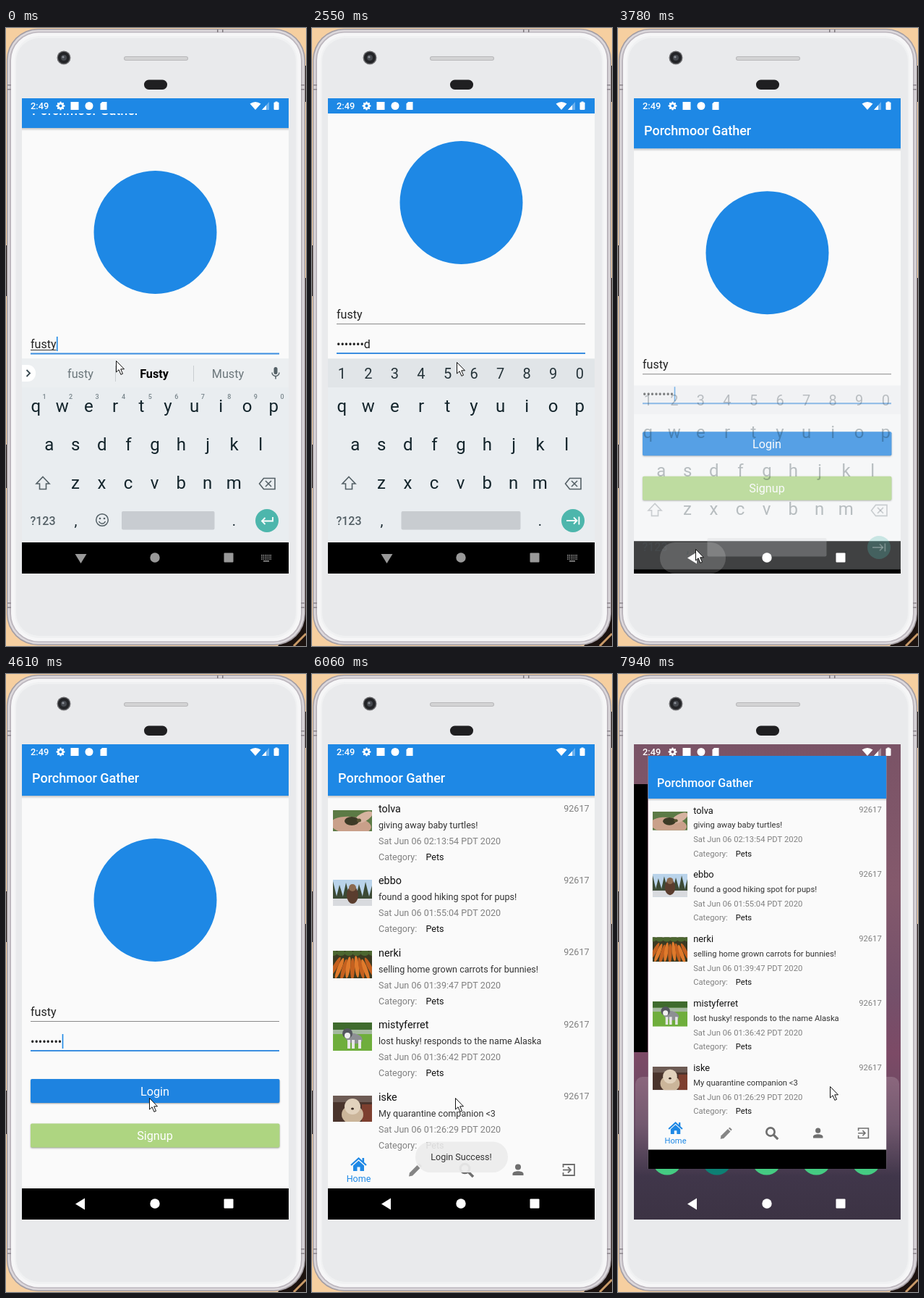
Write an HTML page with a canvas that moves like this. It is 415 by 853 pixels and loops after 8 s.

```html
<!DOCTYPE html>
<html lang="en">
<head>
<meta charset="utf-8">
<title>Phone login</title>
<style>
html, body { margin: 0; width: 100%; height: 100%; overflow: hidden; background: #f6cfa0; }
canvas { display: block; }
</style>
</head>
<body>
<canvas id="stage" width="415" height="853"></canvas>
<script>
const c = document.getElementById('stage').getContext('2d');
const LOOP = 8000, BLUE = '#1e88e5', PAPER = '#fafafa';
const X = 22, Y = 97, W = 369, H = 656;
const APP = 'Porchmoor Gather', USER = 'fusty', SECRET = 'password';
const keyTimes = [660, 780, 900, 1080, 1260, 1380, 1500, 1690];
const posts = [
  ['tolva', 'giving away baby turtles!', '02:13:54', 188, 29],
  ['ebbo', 'found a good hiking spot for pups!', '01:55:04', 284, 36],
  ['nerki', 'selling home grown carrots for bunnies!', '01:39:47', 382, 38],
  ['mistyferret', 'lost husky! responds to the name Alaska', '01:36:42', 481, 39],
  ['iske', 'My quarantine companion <3', '01:26:29', 582, 36]
];
// time, x, y of the pointer tip
const path = [
  [0, 152, 459], [2500, 152, 459], [2548, 200, 461], [2610, 200, 461], [2770, 334, 540],
  [2960, 300, 660], [3230, 107, 719], [3840, 107, 719], [4130, 198, 585], [6170, 198, 585],
  [6270, 300, 482], [6390, 403, 560], [6530, 250, 716], [6650, 83, 700], [6820, 240, 705],
  [7000, 307, 719], [7370, 307, 719], [7760, 293, 569], [8000, 293, 569]
];

const lerp = (a, b, p) => a + (b - a) * p;
const seg = (t, a, b) => Math.min(1, Math.max(0, (t - a) / (b - a)));
const smooth = p => p * p * (3 - 2 * p);
const out = p => 1 - (1 - p) * (1 - p);

function rect(x, y, w, h, fill) { c.fillStyle = fill; c.fillRect(x, y, w, h); }
function round(x, y, w, h, r, fill) {
  c.beginPath(); c.roundRect(x, y, w, h, r); c.fillStyle = fill; c.fill();
}
function oval(x, y, rx, ry, fill, turn = 0) {
  c.beginPath(); c.ellipse(x, y, rx, ry, turn, 0, 7); c.fillStyle = fill; c.fill();
}
function trace(pts, closed) {
  c.beginPath();
  for (let i = 0; i < pts.length; i += 2) c.lineTo(pts[i], pts[i + 1]);
  if (closed) c.closePath();
}
function poly(pts, fill) { trace(pts, true); c.fillStyle = fill; c.fill(); }
function line(pts, color, width = 1.5, closed = false) {
  trace(pts, closed); c.strokeStyle = color; c.lineWidth = width; c.stroke();
}
function ring(x, y, r, color, width) {
  c.beginPath(); c.arc(x, y, r, 0, 7); c.strokeStyle = color; c.lineWidth = width; c.stroke();
}
function text(s, x, y, size, color, align = 'left', weight = 400) {
  c.font = `${weight} ${size}px Roboto, sans-serif`;
  c.textAlign = align; c.fillStyle = color; c.fillText(s, x, y);
}
function clip(x, y, w, h) { c.beginPath(); c.rect(x, y, w, h); c.clip(); }
function group(fn) { c.save(); fn(); c.restore(); }

function phone() {
  rect(0, 0, 415, 853, '#f6cfa0');
  rect(412, 52, 3, 50, '#241a16');
  rect(412, 345, 3, 470, '#2a1e18');
  rect(0, 300, 3, 70, '#241a16');
  rect(0, 575, 3, 60, '#241a16');
  poly([376, 853, 415, 806, 415, 853], '#1c1310');
  line([398, 853, 415, 836], '#c99a68', 3);
  round(1, 1, 413, 851, 43, '#a49ea4');
  round(2.5, 2.5, 410, 848, 42, '#dcd8dc');
  round(5, 5, 405, 843, 40, '#bcb6bd');
  round(7, 6.5, 401, 840, 38, '#f6f6f7');
  round(12, 11, 391, 831, 34, '#f0f1f2');
  round(14, 14, 387, 825, 32, '#e9eaec');
  for (const x of [292, 299]) rect(x, 2, 1.5, 4, '#7d777d');
  for (const y of [78, 84, 793, 799]) {
    rect(2, y, 5, 1.5, '#8d878d'); rect(408, y, 5, 1.5, '#8d878d');
  }
  round(163, 39, 89, 6, 3, '#b9b9bb');
  round(164, 40, 87, 4, 2, '#d3d3d4');
  oval(80, 41, 9.5, 9.5, '#6b6b6e');
  oval(80, 41, 8, 8, '#232427');
  oval(80, 41, 4, 4, '#46494f');
  oval(79, 40, 1.6, 1.6, '#8c9098');
  round(191, 71.5, 32, 13.5, 6.5, '#1f1f21');
}

function statusIcons() {
  text('2:49', 34, 112, 12.8, '#fff', 'left', 500);
  ring(75.5, 107.5, 3.3, '#fff', 2.6);
  for (let i = 0; i < 8; i++) {
    const a = i * Math.PI / 4;
    oval(75.5 + 4.8 * Math.cos(a), 107.5 + 4.8 * Math.sin(a), 1.2, 1.2, '#fff');
  }
  rect(89.5, 102, 11, 11, '#fff');
  oval(115, 107.5, 5.5, 5.5, '#fff');
  poly([133, 102, 139.5, 102, 139.5, 113, 130.5, 113, 130.5, 104.5], '#fff');
  c.beginPath(); c.moveTo(345, 113); c.lineTo(337.5, 104.5);
  c.quadraticCurveTo(345, 99.5, 352.5, 104.5); c.closePath(); c.fillStyle = '#fff'; c.fill();
  poly([354, 113, 364, 102, 364, 113], 'rgba(255,255,255,.35)');
  poly([354, 113, 360, 106.4, 360, 113], '#fff');
  rect(372.5, 101.5, 3, 2, '#fff');
  round(370.5, 102.5, 7, 10.5, 1, '#fff');
}

function toolbar() {
  const g = c.createLinearGradient(0, 168, 0, 172);
  g.addColorStop(0, 'rgba(0,0,0,.22)'); g.addColorStop(1, 'rgba(0,0,0,0)');
  rect(X, 168, W, 4, g);
  rect(X, Y, W, 71, BLUE);
  text(APP, 36, 150, 18, '#fff', 'left', 500);
}

function button(label, y, fill, lift) {
  group(() => {
    c.shadowColor = 'rgba(0,0,0,.35)';
    c.shadowBlur = 2 + lift * 3; c.shadowOffsetY = 1 + lift;
    round(34, y, 344.5, 33, 2, fill);
  });
  if (lift) round(34, y, 344.5, 33, 2, `rgba(255,255,255,${.2 * lift})`);
  text(label, 206, y + 22.5, 16.2, '#fff', 'center');
}

function secretText(t) {
  const n = keyTimes.filter(k => t >= k).length;
  if (!n) return '';
  const plain = t < Math.min(keyTimes[n - 1] + 1490, 3180);
  return '•'.repeat(plain ? n - 1 : n) + (plain ? SECRET[n - 1] : '');
}

function caret(s, y) {
  c.font = '400 16px Roboto, sans-serif';
  rect(34.5 + c.measureText(s).width, y, 1.6, 20, BLUE);
}

function login(t) {
  const back = 1 - seg(t, 3520, 3830);
  const pan = t < 3520 ? lerp(30, 71, out(seg(t, 240, 365))) : 71 * back * back;
  const second = t >= 250;
  group(() => {
    c.translate(0, -pan);
    rect(X, Y, W, H + 80, PAPER);
    toolbar();
    oval(206.5, 312, 85, 85, BLUE);
    text(USER, 34, 472, 16, '#212121');
    if (!second) {
      c.font = '400 16px Roboto, sans-serif';
      rect(34, 474, c.measureText(USER).width, 1, '#333');
      caret(USER, 456);
    }
    rect(34, second ? 479 : 478.5, 344, second ? 1 : 2, second ? '#8a8a8a' : '#3b8ee0');
    const s = secretText(t);
    text(s || 'Password', 34, 513, 16, s ? '#212121' : '#9a9a9a');
    const lastKey = keyTimes.filter(k => t >= k).pop() || 250;
    if (second && Math.floor((t - lastKey) / 486) % 2 === 0) caret(s, 497);
    rect(34, second ? 519 : 520, 344, second ? 2 : 1, second ? '#3b8ee0' : '#8a8a8a');
    const lift = t < 4605 ? seg(t, 4360, 4440) : 0;
    button('Login', 559, '#1e83e0', lift);
    button('Signup', 620.5, '#aed581', 0);
    rect(X, 710, W, 140, '#000');
  });
  rect(X, Y, W, 21, BLUE);
  const hide = seg(t, 3600, 3850);
  if (hide < 1) group(() => {
    c.globalAlpha = 1 - hide;
    c.translate(0, 51 * hide);
    keyboard(t >= 300);
  });
}

function keyboard(digits) {
  const ink = '#13242b', soft = '#546066', step = 36.55;
  rect(X, 456.5, W, 254, '#e9edf0');
  rect(X, 710, W, 60, '#000');
  if (digits) {
    rect(X, 456.5, W, 39.5, '#e1e5e8');
    [...'1234567890'].forEach((k, i) => text(k, 41.3 + i * step, 484, 20, '#26343a', 'center'));
  } else {
    rect(X, 456.5, W, 39.5, '#eceff1');
    round(X, 465, 19, 23, [0, 11, 11, 0], '#fff');
    line([28.5, 472, 33, 476.5, 28.5, 481], '#37474f', 1.8);
    rect(151, 466, 1, 22, '#c9ced1');
    rect(259, 466, 1, 22, '#c9ced1');
    text('fusty', 103, 482.5, 16.2, '#6b767b', 'center');
    text('Fusty', 205, 482.5, 16.2, '#000', 'center', 700);
    text('Musty', 307, 482.5, 16.2, '#6b767b', 'center');
    round(370.5, 468, 5, 10, 2.5, soft);
    c.beginPath(); c.arc(373, 475.5, 5, 0, Math.PI);
    c.strokeStyle = soft; c.lineWidth = 1.4; c.stroke();
    rect(372.3, 480.5, 1.5, 4, soft);
  }
  [...'qwertyuiop'].forEach((k, i) => {
    text(k, 41.3 + i * step, 529.5, 24, ink, 'center');
    if (!digits) text((i + 1) % 10, 53 + i * step, 512, 9, '#78858b', 'center', 500);
  });
  [...'asdfghjkl'].forEach((k, i) => text(k, 59.7 + i * step, 582.5, 24, ink, 'center'));
  [...'zxcvbnm'].forEach((k, i) => text(k, 96 + i * step, 635.5, 24, ink, 'center'));
  line([51, 619.5, 60, 629, 55.5, 629, 55.5, 636.5, 46.5, 636.5, 46.5, 629, 42, 629], soft, 1.6, true);
  line([350.5, 629, 356.5, 621.5, 372, 621.5, 372, 636.5, 356.5, 636.5], soft, 1.6, true);
  line([359, 625, 367, 633], soft, 1.6);
  line([367, 625, 359, 633], soft, 1.6);
  text('?123', 51, 685.5, 16, soft, 'center', 500);
  text(',', 96.5, 687, 20, ink, 'center');
  text('.', 315.5, 687, 20, ink, 'center');
  if (digits) round(123.5, 667, 165, 25.5, 2, '#c8ccd0');
  else {
    round(160, 667, 128.5, 25.5, 2, '#c8ccd1');
    ring(133, 679, 8.3, soft, 1.5);
    oval(130, 677, 1.3, 1.3, soft);
    oval(136, 677, 1.3, 1.3, soft);
    c.beginPath(); c.arc(133, 679.5, 4.6, .3, Math.PI - .3); c.stroke();
  }
  oval(361, 680, 16, 16, '#4db6ac');
  if (digits) {
    line([352, 680, 366, 680], '#fff', 1.8);
    line([362, 675.5, 366.5, 680, 362, 684.5], '#fff', 1.8);
    rect(368.5, 674.5, 1.8, 11, '#fff');
  } else {
    line([369, 675, 369, 680.5, 354, 680.5], '#fff', 1.8);
    line([358.5, 676, 354, 680.5, 358.5, 685], '#fff', 1.8);
  }
}

function thumb(i, h) {
  clip(0, 0, 54, h);
  if (i === 0) {
    rect(0, 0, 54, h, '#5c7a45');
    oval(25, 21, 28, 12, '#c9a08a', .1);
    oval(42, 10, 14, 6, '#d6b3a0', -.5);
    oval(26, 15, 10, 6, '#3c3a26');
    oval(36, 14, 3, 2.5, '#55502f');
  } else if (i === 1) {
    rect(0, 0, 54, h, '#b9d3ea');
    for (let k = 0; k < 7; k++) poly([k * 9 - 5, 27, k * 9, 2 + k * 5 % 8, k * 9 + 6, 27], '#3c4a35');
    rect(0, 26, 54, 10, '#d8dade');
    oval(27, 21, 8, 12, '#5a3d2e');
    oval(27, 11, 5, 5, '#8b6a50');
  } else if (i === 2) {
    rect(0, 0, 54, h, '#3b3a22');
    for (let k = 0; k < 9; k++) oval(3 + k * 6, 22 + k * 7 % 5, 3, 15, k % 2 ? '#e07a2c' : '#c4601f', .5 - k * .12);
    for (let k = 0; k < 6; k++) oval(k * 11, 3, 6, 4, '#4c6630');
  } else if (i === 3) {
    rect(0, 0, 54, h, '#6fae3c');
    rect(0, 0, 54, 10, '#3f6b2d');
    rect(0, 10, 54, 6, '#a5b9a0');
    oval(29, 22, 12, 7, '#8d8f94', .2);
    for (const x of [20, 26, 35]) rect(x, 24, 4, 12, '#e6e6e6');
    oval(20, 15, 7, 7, '#55585f');
    oval(20, 18, 4, 4, '#f0f0f0');
  } else {
    rect(0, 0, 54, h, '#4a342c');
    rect(0, 0, 54, 9, '#6d5b54');
    rect(40, 12, 14, 24, '#7d3f2f');
    oval(27, 26, 15, 13, '#cbb59a');
    oval(27, 15, 11, 11, '#e2d2bd');
    oval(27, 18, 2, 1.6, '#3a2b24');
  }
}

function home(loaded) {
  rect(X, Y, W, H + 30, PAPER);
  posts.forEach(([name, body, time, top, h], i) => {
    const y = 186 + i * 99.45;
    if (loaded) group(() => { c.translate(29, top); thumb(i, h); });
    text(name, 92, y + 5, 14.37, '#111');
    text(body, 92, y + 27, 12.57, '#333');
    text(`Sat Jun 06 ${time} PDT 2020`, 92, y + 49, 12.57, '#808080');
    text('Category:', 92, y + 71, 12.57, '#808080');
    text('Pets', 157.5, y + 71, 12.57, '#111');
    text('92617', 383.5, y + 3.5, 12.57, '#808080', 'right');
  });
  const gray = '#6f6f6f';
  line([54, 678, 64.5, 668.5, 75, 678], BLUE, 2.2);
  rect(69.5, 668, 2.6, 6, BLUE);
  poly([57, 678.5, 64.5, 671.8, 72, 678.5, 72, 686, 66.5, 686, 66.5, 680.5, 62.5, 680.5, 62.5, 686, 57, 686], BLUE);
  text('Home', 64.5, 701, 12.5, BLUE, 'center');
  poly([134, 693.5, 135, 688.5, 145.5, 678, 149.5, 682, 139, 692.5], '#858585');
  poly([146.5, 677, 148.5, 675.5, 152, 679, 150.5, 681], '#858585');
  ring(211.5, 682.5, 6.3, gray, 3);
  line([216, 687, 223, 694], gray, 3.6);
  oval(285, 680.5, 4, 4, gray);
  c.beginPath(); c.moveTo(277.5, 692); c.lineTo(277.5, 689.5);
  c.bezierCurveTo(278, 685, 292, 685, 292.5, 689.5); c.lineTo(292.5, 692); c.fill();
  line([347.5, 681, 347.5, 677, 363, 677, 363, 692, 347.5, 692, 347.5, 688], gray, 1.8);
  line([347, 684.5, 358, 684.5], gray, 1.8);
  line([354, 680.5, 358, 684.5, 354, 688.5], gray, 1.8);
  rect(X, 710, W, 80, '#000');
  toolbar();
}

function wallpaper() {
  const g = c.createLinearGradient(0, Y, 0, Y + H);
  [[0, '#7a5366'], [.3, '#84596c'], [.52, '#74506a'], [.65, '#7c4a66'], [.8, '#664a62'], [.91, '#40364a'], [1, '#3c3344']]
    .forEach(([p, col]) => g.addColorStop(p, col));
  rect(X, Y, W, H, g);
  const d = c.createLinearGradient(0, 556, 0, 692);
  d.addColorStop(0, 'rgba(255,255,255,.16)'); d.addColorStop(1, 'rgba(255,255,255,0)');
  round(24, 556, 365, 136, 10, d);
  for (let i = 0; i < 5; i++) oval(68 + i * 68.8, 671, 20.5, 20.5, i === 1 ? '#0d8074' : '#45cb82');
}

function recents(t) {
  const p = smooth(seg(t, 7480, 7940)), k = 1 - .106 * p;
  wallpaper();
  rect(X, 152, 19 * p, 370, '#000');
  group(() => {
    const top = lerp(Y, 113, p);
    clip(X, top, W, lerp(753, 683, p) - top);
    c.translate(206.5, 97 + 11.5 * p);
    c.scale(k, k);
    c.translate(-206.5, -97);
    clip(X, Y, W, H);
    home(true);
  });
}

function toast(t) {
  const a = seg(t, 5020, 5190) * (1 - seg(t, 6870, 7180));
  if (!a) return;
  group(() => {
    c.globalAlpha = a;
    round(143, 645.5, 128, 42.5, 21, 'rgba(236,236,236,.92)');
    text('Login Success!', 206.5, 671, 12.57, '#333', 'center');
  });
}

function ripple(x, grow, fade) {
  if (!grow || fade >= 1) return;
  const w = 91 * (.4 + .6 * grow);
  round(x - w / 2, 710, w, 43, Math.min(21, w / 2), `rgba(255,255,255,${.17 * (1 - fade)})`);
}

function navIcons(t) {
  const p = seg(t, 3560, 3780);
  ripple(103.5, seg(t, 3230, 3400), seg(t, 3840, 4100));
  ripple(308, seg(t, 7350, 7470), seg(t, 7500, 7700));
  group(() => {
    c.globalAlpha = lerp(.6, 1, p);
    group(() => {
      c.translate(103.5, 731.5);
      c.rotate(p * Math.PI / 2);
      poly([-8, -5.5, 8, -5.5, 0, 7.5], '#fff');
    });
    oval(206, 731, 6.7, 6.7, '#fff');
    round(301.5, 724.5, 13, 13, 1, '#fff');
  });
  if (p < 1) group(() => {
    c.globalAlpha = .6 * (1 - p);
    for (let r = 0; r < 3; r++)
      for (let i = 0; i < 6; i++) rect(353 + i * 2.5, 727 + r * 2.6, 1.5, 1.5, '#fff');
    rect(356, 735, 8, 1.5, '#fff');
  });
}

function pointer(t) {
  let i = 1;
  while (i < path.length - 1 && t >= path[i][0]) i++;
  const a = path[i - 1], b = path[i], p = smooth(seg(t, a[0], b[0]));
  group(() => {
    c.translate(lerp(a[1], b[1], p) + .5, lerp(a[2], b[2], p) + .5);
    const arrow = [0, 0, 0, 15.5, 3.6, 12.2, 6.4, 18.8, 9, 17.7, 6.2, 11.3, 11, 11.3];
    poly(arrow, '#fff');
    line(arrow, '#111', 1, true);
  });
}

function draw(t) {
  phone();
  group(() => {
    clip(X, Y, W, H);
    if (t < 5340) {
      const p = t < 4980 ? 0 : out(seg(t, 4940, 5340));
      group(() => { c.translate(0, -13 * p); login(t); });
      if (p) {
        rect(X, Y, W, H, `rgba(0,0,0,${.16 * p})`);
        group(() => {
          const top = Y + H * Math.pow(1 - p, 2.31);
          clip(X, top, W, Y + H - top);
          c.translate(0, 27 * (1 - p));
          home(t >= 5280);
        });
      }
    } else if (t < 7480) home(true);
    else recents(t);
    statusIcons();
    toast(t);
    navIcons(t);
  });
  pointer(t);
}

const start = performance.now();
function tick(now) {
  draw(Math.max(0, now - start) % LOOP);
  requestAnimationFrame(tick);
}
draw(0);
requestAnimationFrame(tick);
</script>
</body>
</html>
```
